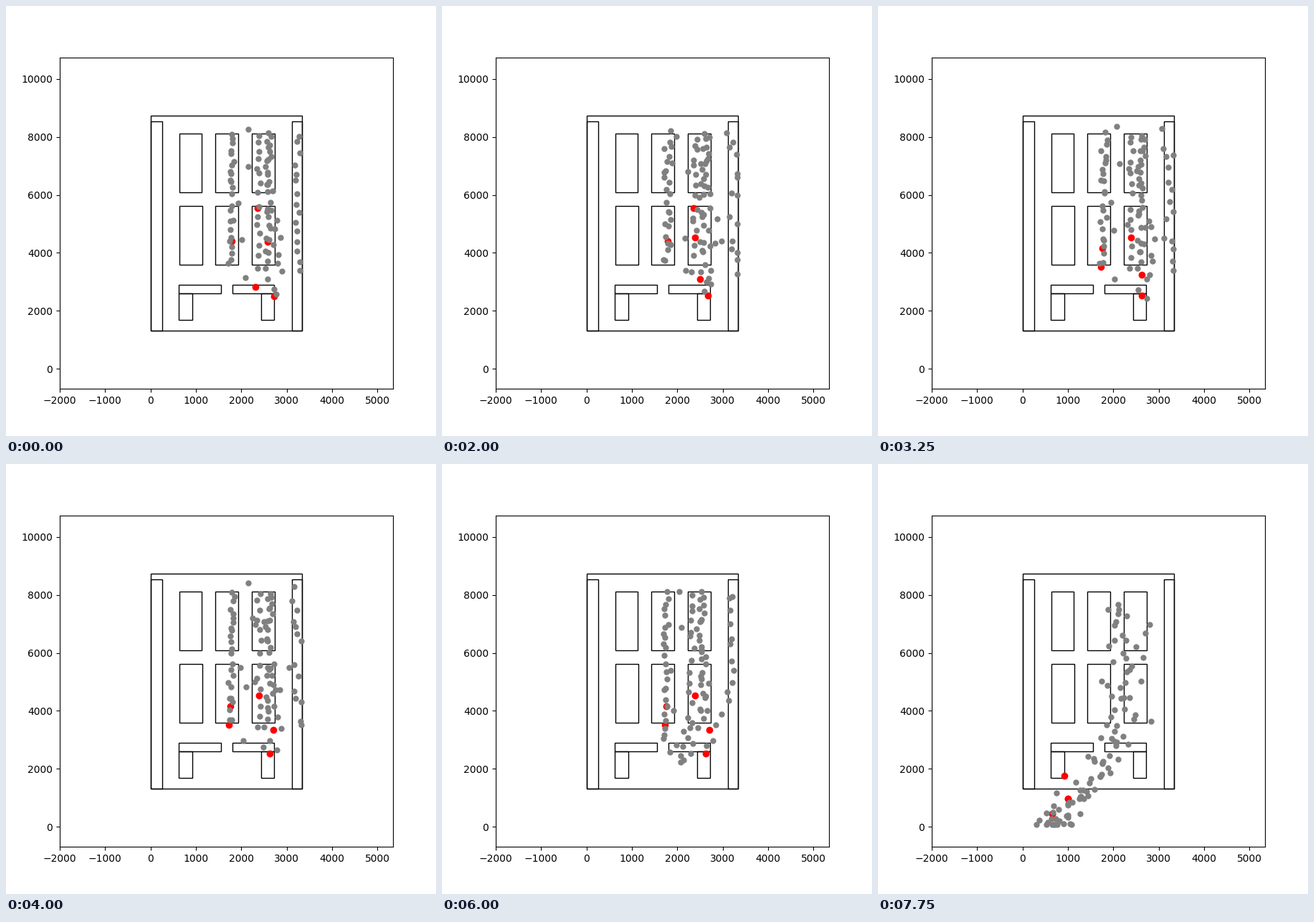
Recreate the animation shown at these times as a matplotlib script. Size 600 by 600 pixels, loop 8000 ms.

```python
import numpy as np
import matplotlib.pyplot as plt
from matplotlib.animation import FuncAnimation
from matplotlib.patches import Rectangle

FRAMES, INTERVAL = 32, 250
LEAVE, RUSH, SPILL, LAST = 22, 25, 27, 31
UPPER, LOWER = (6085, 8115), (3590, 5614)

rng = np.random.default_rng(7)


def line_up(x, spread, count, y0, y1):
    """People spaced loosely along a strip, as rows of (x, y)."""
    xs = rng.normal(x, spread, count)
    ys = np.linspace(y0, y1, count) + rng.normal(0, 60, count)
    return np.column_stack([xs, ys])


seated = [line_up(x, spread, count, *block)
          for x, spread, counts in ((1790, 35, (13, 11)), (2370, 25, (8, 7)), (2590, 60, (17, 11)))
          for block, count in zip((UPPER, LOWER), counts)]
walking = [line_up(3230, 45, 15, 3400, 8100),
           line_up(2800, 130, 12, 2500, 5700),
           line_up(2060, 90, 5, 3150, 8200)]
people = np.clip(np.vstack(seated + walking), (1700, 2450), (3310, 8300))
home_x, home_y = people.T
count = len(people)

# Walkers wander far, the seated only shift a little
is_walker = np.arange(count) >= sum(map(len, seated))
amp_x = np.where(is_walker, 90, 30)
amp_y = np.where(is_walker, 230, 65)
rate = rng.uniform(0.2, 0.55, (2, count))
phase = rng.uniform(0, 2 * np.pi, (2, count))

# Place in the queue for the exit: 0 is first, 1 is last
queue = np.argsort(np.argsort(home_y)) / (count - 1)


def stroll(t):
    sway = np.sin(rate * t + phase) - np.sin(phase)
    x = np.clip(home_x + amp_x * sway[0], 1700, 3320)
    y = np.clip(home_y + amp_y * sway[1], 2330, 8480)
    return np.array([x, y])


def crowd(low, high, power, tight, wide, noise):
    """Spread the queue along the way out; a higher power packs the exit."""
    y = low + (high - low) * queue ** power + rng.normal(0, noise, count)
    y = np.maximum(y, low)
    route = np.interp(y, [100, 1000, 2500, 4000], [650, 1100, 1850, 2250])
    width = np.interp(y, [1500, 4500], [tight, wide])
    x = route + width * (home_x - 2350) + rng.normal(0, noise, count)
    return np.array([x, y])


rush = crowd(1950, 8200, 0.9, 0.4, 1, 40)
rush[0] = np.clip(rush[0], 1690, 3310)
stages = [stroll(LEAVE), rush,
          crowd(300, 8050, 0.95, 0.15, 0.95, 60),
          crowd(85, 7800, 1.75, 0.4, 0.45, 130)]
stage_times = [LEAVE, RUSH, SPILL, LAST]


def guests(t):
    if t <= LEAVE:
        return stroll(t)
    i = np.searchsorted(stage_times, t) - 1
    k = (t - stage_times[i]) / (stage_times[i + 1] - stage_times[i])
    return stages[i] + (stages[i + 1] - stages[i]) * k


# Staff: when they walk to their post, then start, post, way out and rest
STAFF = [
    (8, 13, (1790, 4410), (1730, 3510), (690, 250), (650, 440)),
    (8, 13, (2360, 5540), (1750, 4150), (970, 710), (1000, 970)),
    (0, 8, (2580, 4380), (2385, 4520), (920, 770), (1000, 970)),
    (0, 16, (2310, 2820), (2700, 3350), (1000, 1780), (920, 1750)),
    (0, 13, (2720, 2510), (2630, 2520), (670, 310), (650, 440))]


def staff(t):
    spots = []
    for go, arrive, start, post, out, rest in STAFF:
        times = [go, arrive, RUSH, SPILL, LAST]
        path = zip(start, post, post, out, rest)
        spots.append([np.interp(t, times, axis) for axis in path])
    return np.transpose(spots)


fig, ax = plt.subplots(figsize=(6, 6), dpi=100)
ax.set_xlim(-2000, 5340)
ax.set_ylim(-690, 10740)


def box(x0, x1, y0, y1):
    ax.add_patch(Rectangle((x0, y0), x1 - x0, y1 - y0, fill=False, ec="black", lw=1))


box(0, 3340, 1310, 8735)
box(0, 257, 1310, 8537)
box(3115, 3340, 1310, 8537)
box(636, 1126, *UPPER)
box(636, 1138, *LOWER)
for left in (1425, 2230):
    for block in (UPPER, LOWER):
        box(left, left + 502, *block)
box(620, 1552, 2593, 2890)
box(1804, 2720, 2593, 2890)
box(620, 920, 1680, 2593)
box(2436, 2720, 1680, 2593)

red, = ax.plot([], [], "o", color="red", ms=6, zorder=3)
gray, = ax.plot([], [], "o", color="gray", ms=5, zorder=4)


def draw(t):
    red.set_data(*staff(t))
    gray.set_data(*guests(t))
    return red, gray


anim = FuncAnimation(fig, draw, frames=FRAMES, interval=INTERVAL, repeat=True)
plt.show()
```
